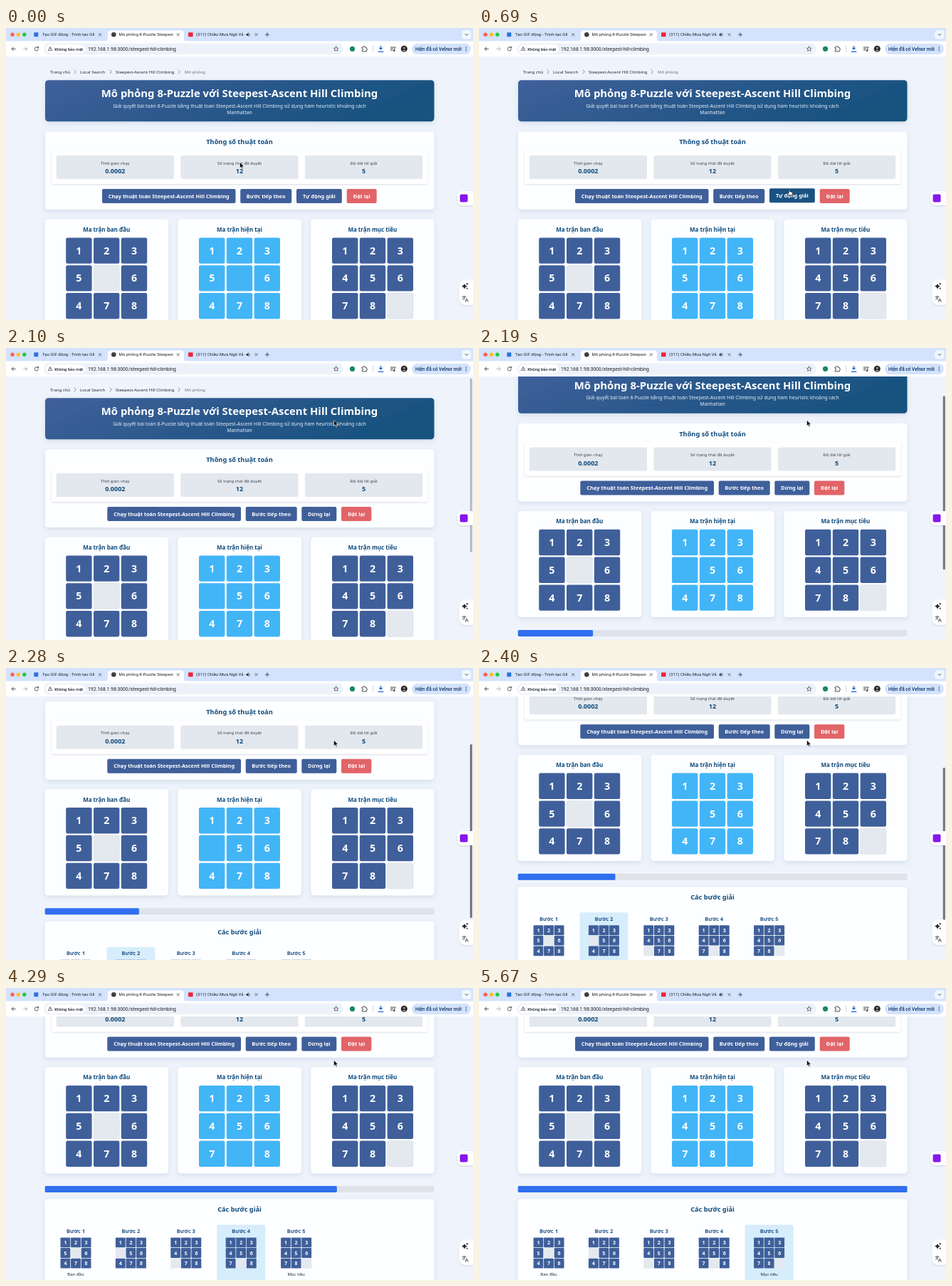
Recreate the animation shown at these times as an HTML page. Size 656 px wide and 410 px high, loop 6270 ms.

```html
<!DOCTYPE html>
<html lang="vi">
<head>
<meta charset="utf-8">
<title>8-Puzzle</title>
<style>
html, body { margin: 0; width: 100%; height: 100%; overflow: hidden; background: #eff4fc; }
svg { display: block; }
#stage { width: 100vw; height: 100vh; }
.page { font-family: "Noto Sans", "Open Sans", sans-serif; }
.ui { font-family: Roboto, Inter, sans-serif; }
.line { fill: none; stroke-linecap: round; stroke-linejoin: round; }
</style>
</head>
<body>
<svg id="stage" viewBox="0 0 656 410" xmlns="http://www.w3.org/2000/svg"></svg>
<script>
const LOOP = 6270, CLICK = 1150, STEP = 900, FADE = 300;
const BLUE = '#3f5f9a', SKY = '#42b5f7', NAVY = '#0d4a7c', DEEP = '#14507e', RED = '#e26468';
const BOARDS = ['1235 6478', '123 56478', '123456 78', '1234567 8', '12345678 '];

const rect = (x, y, w, h, fill, rx = 0, extra = '') =>
  `<rect x="${x}" y="${y}" width="${w}" height="${h}" rx="${rx}" fill="${fill}" ${extra}/>`;
const circle = (x, y, r, fill, extra = '') => `<circle cx="${x}" cy="${y}" r="${r}" fill="${fill}" ${extra}/>`;
const line = (d, color = '#3c4043', w = 0.9, extra = '') =>
  `<path class="line" d="${d}" stroke="${color}" stroke-width="${w}" ${extra}/>`;
// cy is the middle of the capital letters
const text = (x, cy, str, size, fill, weight = 700, anchor = 'middle') =>
  `<text x="${x}" y="${(cy + size * 0.357).toFixed(2)}" font-size="${size}" fill="${fill}" font-weight="${weight}" text-anchor="${anchor}">${str}</text>`;
const group = (id, body, extra = '') => `<g id="${id}" ${extra}>${body}</g>`;
const card = (x, y, w, h) => rect(x, y, w, h, '#fdfeff', 4.5, 'filter="url(#shadow)"');

function grid(x, y, pitch, size, font, board, fill, blank) {
  return [...board].map((n, i) => {
    const cx = x + (i % 3) * pitch, cy = y + Math.floor(i / 3) * pitch;
    const empty = n === ' ' && blank;
    const dash = empty ? `stroke="#c3cad4" stroke-width="${size / 70}" stroke-dasharray="${size / 24}"` : '';
    return rect(cx, cy, size, size, empty ? '#e4e9ef' : fill, size / 16, dash) +
      (n === ' ' ? '' : text(cx + size / 2, cy + size / 2, n, font, '#fff'));
  }).join('');
}

const bigGrid = (x, board, fill, blank) => grid(x, 294.4, 38.8, 36.4, 14.2, board, fill, blank);

function button(x, w, label, fill, id = '') {
  return `<g ${id && `id="${id}"`}>` + rect(x, 226, w, 20, fill, 2) +
    text(x + w / 2, 236, label, 7.38, '#fff') + '</g>';
}

function buttonRow(id, xs, ws, toggle) {
  const labels = ['Chạy thuật toán Steepest-Ascent Hill Climbing', 'Bước tiếp theo', toggle, 'Đặt lại'];
  return group(id, labels.map((s, i) =>
    button(xs[i], ws[i], s, i === 3 ? RED : BLUE, i === 2 ? id + 'Toggle' : '')).join(''));
}

function breadcrumb() {
  const left = (x, s, c) => text(x, 61.5, s, 6, c, 400, 'start');
  return left(62, 'Trang chủ', '#23272f') + left(104, 'Local Search', '#23272f') +
    left(154, 'Steepest-Ascent Hill Climbing', '#23272f') + left(251, 'Mô phỏng', '#6a7280') +
    [97, 147, 243].map(x => line(`M${x - 1} 59l2.4 2.5l-2.4 2.5`, '#6a7280', 0.8)).join('');
}

function banner() {
  return rect(55, 73.3, 546.5, 58, 'url(#banner)', 4.5, 'filter="url(#shadow)"') +
    text(328, 92, 'Mô phỏng 8-Puzzle với Steepest-Ascent Hill Climbing', 14.9, '#fff') +
    text(328, 109.3, 'Giải quyết bài toán 8-Puzzle bằng thuật toán Steepest-Ascent Hill Climbing sử dụng hàm heuristic khoảng cách', 6.87, '#e9eff7', 400) +
    text(328, 118.2, 'Manhattan', 6.87, '#e9eff7', 400);
}

function stats() {
  const items = [['Thời gian chạy', '0.0002'], ['Số trạng thái đã duyệt', '12'], ['Độ dài lời giải', '5']];
  return card(55, 145.4, 546.5, 109.6) + text(328, 160, 'Thông số thuật toán', 9.23, NAVY) +
    rect(64, 172.3, 528.5, 46.7, '#fff', 3, 'filter="url(#soft)"') +
    items.map(([label, value], i) => {
      const x = 70.7 + i * 174.6;
      return rect(x, 179, 165.3, 33, '#e3e8ee', 2) +
        text(x + 82.6, 189.7, label, 6, '#3d4550', 400) + text(x + 82.6, 201, value, 9, NAVY);
    }).join('') +
    buttonRow('idle', [135, 329.2, 408, 478.7], [187.5, 72, 63.8, 42], 'Tự động giải') +
    buttonRow('running', [142.3, 336.7, 415.3, 471], [187.7, 72, 49, 42.3], 'Dừng lại');
}

function boards() {
  const titles = ['Ma trận ban đầu', 'Ma trận hiện tại', 'Ma trận mục tiêu'];
  return titles.map((s, i) => card(54.7 + i * 186.8, 268.7, 173.4, 149) +
    text(141.2 + i * 186.8, 283, s, 8, NAVY)).join('') +
    bigGrid(84.2, BOARDS[0], BLUE, true) +
    BOARDS.map((b, i) => group('now' + i, bigGrid(271, b, SKY, false))).join('') +
    bigGrid(458, BOARDS[4], BLUE, true);
}

function steps() {
  return rect(54.7, 435.6, 546.8, 9, '#dfe3e9', 1.5) + rect(54.7, 435.6, 0, 9, '#2f6ff0', 1.5, 'id="bar"') +
    card(54.7, 454, 546.8, 160) + text(328, 468.6, 'Các bước giải', 9.2, NAVY) +
    BOARDS.map((b, i) => {
      const cx = 98 + i * 77.4;
      return rect(cx - 34, 490, 68, 90, '#d6edfb', 3, `id="mark${i}"`) +
        text(cx, 499, 'Bước ' + (i + 1), 7.5, '#23548c') +
        grid(cx - 21.5, 508, 14.6, 13.8, 7, b, BLUE, true) +
        (i % 4 ? '' : text(cx, 559.4, i ? 'Mục tiêu' : 'Ban đầu', 6, '#23272f', 400));
    }).join('');
}

function tab(x, w, title, icon) {
  return icon + `<svg x="${x}" y="0" width="${w}" height="18">` +
    text(0, 9.3, title, 6.1, '#1f2328', 400, 'start') + '</svg>';
}

function browser() {
  const close = x => line(`M${x - 1.7} 7.6l3.4 3.4m0 -3.4l-3.4 3.4`, '#3c4043', 0.75);
  return rect(0, 0, 656, 19, '#d3e3fd') + rect(0, 18.4, 656, 21.6, '#fff') +
    `<path d="M139 18.6q4 0 4 -4v-7q0 -4 4 -4h99q4 0 4 4v7q0 4 4 4z" fill="#fff"/>` +
    circle(9, 9.3, 2.7, '#fe5f57') + circle(17.4, 9.3, 2.7, '#febc2e') + circle(25.8, 9.3, 2.7, '#28c840') +
    tab(51, 73, 'Tạo GIF động - Trình tạo GIF', rect(39.3, 6.2, 6, 6, '#2f74d8', 1)) +
    tab(158.5, 76, 'Mô phỏng 8-Puzzle Steepest', circle(151.3, 9.3, 3.3, '#3c4043')) +
    tab(267, 67, '(311) Chiều Mưa Ngõ Vắng', rect(256, 6.2, 6.6, 6, '#f0243a', 1)) +
    close(132.2) + close(241.8) + close(351.5) +
    line('M364.5 9.3h5m-2.5 -2.5v5') +
    '<path d="M337.3 8.2h1.4l2 -1.7v5.6l-2 -1.7h-1.4z" fill="#3c4043"/>' + line('M342 7.6q1.4 1.7 0 3.4', '#3c4043', 0.6) +
    rect(640.3, 3, 13, 12.6, '#f1f6ff', 4) + line('M645 8.4l2 2l2 -2') +
    line('M13.2 29.3h-5m2.3 -2.4l-2.4 2.4l2.4 2.4') +
    line('M24.8 29.3h5m-2.3 -2.4l2.4 2.4l-2.4 2.4', '#a9adb3') +
    line('M45 27.6a2.7 2.7 0 1 0 .5 2.4m.2 -4v1.9h-1.9') +
    rect(53, 21.6, 421, 15.6, '#edf2fa', 7.8) + rect(55.5, 23.4, 56, 12, '#fff', 6) +
    line('M62.2 26.6l2.7 4.8h-5.4zM62.2 28.4v1.3', '#3c4043', 0.7) +
    text(68.3, 29.5, 'Không bảo mật', 5.9, '#1f2328', 500, 'start') +
    text(115, 29.5, '192.168.1.98:3000/steepest-hill-climbing', 6.8, '#1f2328', 400, 'start') +
    line('M463.7 26l1 2.2l2.4 .2l-1.8 1.6l.6 2.3l-2.2 -1.2l-2.2 1.2l.6 -2.3l-1.8 -1.6l2.4 -.2z', '#3c4043', 0.7) +
    circle(486.5, 29.3, 3.6, '#16856a') +
    line('M500.3 27h1.7q0 -1.5 1.2 -1.5t1.2 1.5h1.8v1.8q1.4 0 1.4 1.1t-1.4 1.1v2h-5.9v-2q1.5 0 1.5 -1.1t-1.5 -1.1z') +
    line('M515.5 25.5v8', '#c6d7f3') +
    line('M526.5 25.3v4.6m-2 -1.9l2 2l2 -2M523 33.4h7', '#1a63d8', 1.1) +
    line('M540.4 27h5m-5 2h3.4m-3.4 2h2.4M546 31.6v-4.6h1.4') + circle(545, 31.7, 1.2, '#3c4043') +
    circle(559.3, 29.3, 4.5, '#26262c') + circle(559.3, 28, 1.5, '#b49a91') +
    '<path d="M556.6 32.3q2.7 -3.6 5.4 0q-2.7 2 -5.4 0z" fill="#8d7f80"/>' +
    rect(570, 22, 83, 15, '#d3e3fd', 7.5) +
    text(575, 29.5, 'Hiện đã có Velnor mới', 6.55, '#0b2f66', 500, 'start') +
    [27, 29.4, 31.8].map(y => circle(646.2, y, 0.7, '#0b2f66')).join('');
}

function floaters() {
  const spark = (x, y, r) => `<path d="M${x} ${y - r}q${r * .2} ${r * .8} ${r} ${r}q${-r * .8} ${r * .2} ${-r} ${r}q${-r * .2} ${-r * .8} ${-r} ${-r}q${r * .8} ${-r * .2} ${r} ${-r}z" fill="#23272f"/>`;
  return '<path d="M656 229h-15q-7 0 -7 7v6q0 7 7 7h15z" fill="#fff" filter="url(#soft)"/>' +
    rect(637.6, 233.6, 11, 11, '#8418ee', 2) +
    rect(636.5, 353, 24, 36, '#fff', 9, 'filter="url(#soft)"') +
    spark(644, 362.7, 3.8) + spark(647.8, 359.3, 1.7) + spark(647.8, 365.8, 1.5) +
    line('M641 377.3h5m-2.5 -1.2v1.2m1.7 0q-.8 3 -3.8 4.4m.8 -3.4q1 2 2.6 2.8M645.3 384.4l2 -4.8l2 4.8m-3.3 -1.6h2.6', '#3c4043', 0.75);
}

const arrow = group('arrow', '<path d="M0 0v8.2l1.9 -1.7l1.3 3l1.4 -.6l-1.3 -2.9h2.6z" fill="#000" stroke="#fff" stroke-width=".6"/>');
const hand = group('hand', '<path d="M-.9 -3.3q.9 -1.2 1.6 0v3l3 .7q1 .3 .9 1.3l-.6 3.2h-4.2l-2.7 -3.3q.4 -1 1.4 -.3l.6 .5z" fill="#fff" stroke="#111" stroke-width=".8"/>');

const stage = document.getElementById('stage');
stage.innerHTML = `<defs>
  <linearGradient id="banner" x1="0" y1="0" x2="1" y2=".25"><stop stop-color="#40609b"/><stop offset="1" stop-color="#17527f"/></linearGradient>
  <filter id="shadow" x="-10%" y="-20%" width="120%" height="150%"><feDropShadow dx="0" dy="2.5" stdDeviation="3.5" flood-color="#40608f" flood-opacity=".16"/></filter>
  <filter id="soft" x="-20%" y="-20%" width="140%" height="150%"><feDropShadow dx="0" dy="1" stdDeviation="1.3" flood-color="#405070" flood-opacity=".2"/></filter>
  </defs>` +
  rect(0, 0, 656, 410, '#eff4fc') +
  `<g class="page">${group('scroll', breadcrumb() + banner() + stats() + boards() + steps())}</g>` +
  rect(651.8, 0, 3, 244, '#6f747b', 1.5, 'id="thumb"') +
  floaters() + `<g class="ui">${browser()}</g>` + arrow + hand;

const el = {};
stage.querySelectorAll('[id]').forEach(n => el[n.id] = n);

const clamp = v => Math.min(1, Math.max(0, v));
const mix = (a, b, k) => a + (b - a) * k;
const smooth = v => (v = clamp(v), v * v * (3 - 2 * v));
const show = (node, on) => node.setAttribute('display', on ? 'inline' : 'none');
const move = (node, x, y) => node.setAttribute('transform', `translate(${x.toFixed(2)} ${y.toFixed(2)})`);

// CSS "ease": cubic-bezier(.25, .1, .25, 1)
function ease(v) {
  v = clamp(v);
  let lo = 0, hi = 1, s = v;
  for (let i = 0; i < 18; i++) {
    s = (lo + hi) / 2;
    const x = 0.75 * s * (1 - s) + s * s * s;
    if (x < v) lo = s; else hi = s;
  }
  return 0.3 * s * (1 - s) ** 2 + 3 * s * s * (1 - s) + s ** 3;
}

const fadeIn = (t, start) => ease((t - start) / FADE);
const scrollAt = t => t < 2060 ? 0 : 157.5 * (1 - Math.exp(-(((t - 2060) / 223) ** 2.33)));
const startOf = i => i ? CLICK + STEP * i : -FADE;

function draw(t) {
  const y = scrollAt(t);
  move(el.scroll, 0, -y);
  move(el.thumb, 0, 40.6 + y * 0.676);
  el.thumb.setAttribute('opacity', clamp((t - 2060) / 90) * clamp((3240 - t) / 200));

  const step = Math.min(4, Math.max(0, Math.floor((t - CLICK) / STEP)));
  let done = 0;
  BOARDS.forEach((_, i) => {
    show(el['now' + i], i === step);
    const on = fadeIn(t, startOf(i));
    const off = i < 4 ? fadeIn(t, startOf(i + 1)) : 0;
    el['mark' + i].setAttribute('opacity', on - off);
    if (i) done += on / 4;
  });
  el.bar.setAttribute('width', (546.8 * done).toFixed(2));

  const running = t >= CLICK && t < CLICK + STEP * 5;
  show(el.running, running);
  show(el.idle, !running);

  const to = smooth((t - 20) / 620), away = smooth((t - 1415) / 415);
  const cx = mix(mix(328.5, 436, to), 460.5, away);
  const cy = mix(mix(188.5, 230, to), 101.3, away);
  const over = cy > 226 && cx > 408;
  move(el.arrow, cx, cy);
  move(el.hand, cx, cy);
  show(el.arrow, !over);
  show(el.hand, over);

  const hover = fadeIn(t, 520) - fadeIn(t, 1480);
  for (const node of [el.idleToggle, el.runningToggle]) {
    move(node, 0, -hover);
    node.firstChild.setAttribute('fill', `rgb(${mix(63, 20, hover)},${mix(95, 80, hover)},${mix(154, 126, hover)})`);
  }
}

const begin = performance.now();
function tick() {
  draw((performance.now() - begin) % LOOP);
  requestAnimationFrame(tick);
}
tick();
</script>
</body>
</html>
```
